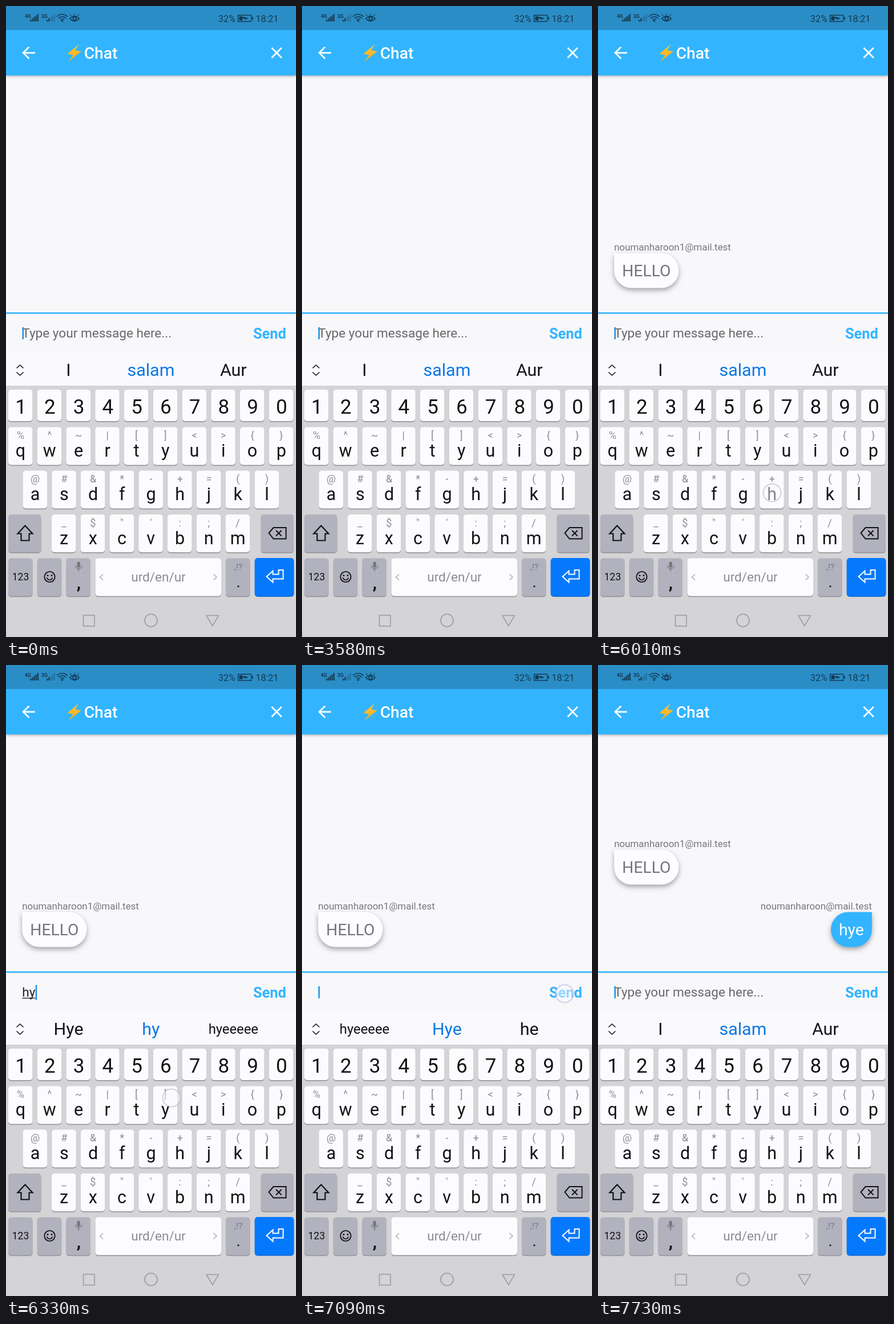
An HTML page with a canvas that plays this animation: 508x1102 px, repeating every 8 s.

```html
<!DOCTYPE html>
<html lang="en">
<head>
<meta charset="utf-8">
<title>Chat</title>
<style>
  html, body { margin: 0; width: 100%; height: 100%; overflow: hidden; background: #f8f7fa; }
  canvas { display: block; width: 508px; height: 1102px; }
</style>
</head>
<body>
<canvas id="stage"></canvas>
<script>
const W = 508, H = 1102, LOOP = 8000;
const BLUE = '#33b4ff', PAPER = '#f8f7fa', BOARD = '#d4d3d5', KEY = '#fcfbfe', DARK_KEY = '#b2b2be';
const INK = '#121214', HINT = '#8d8c92', ACCENT = '#0b78e3', STATUS = '#123a52';
const PITCH = 50.75;

const canvas = document.getElementById('stage');
const ctx = canvas.getContext('2d');
const dpr = window.devicePixelRatio || 1;
canvas.width = W * dpr;
canvas.height = H * dpr;

// Timeline
const ARRIVE = 3710, SENT = 7160, CLEARED = 7050;
const typed = [[6050, 'h'], [6320, 'hy'], [6640, 'hye'], [CLEARED, '']];
const hints = [
  [0, ['I', 'salam', 'Aur']],
  [6050, ['He', 'h', 'ho']],
  [6320, ['Hye', 'hy', 'hyeeeee']],
  [6640, ['hyeeeee', 'Hye', 'he']],
  [SENT, ['I', 'salam', 'Aur']]
];
// Each fade flips the caret, which starts visible
const fades = [
  [60, 190], [580, 700], [1020, 1280], [1470, 1730], [2050, 2170], [2560, 2680],
  [3000, 3200], [3579, 3580], [4030, 4160], [4500, 4600], [5030, 5160], [5440, 5560],
  [7470, 7540], [7600, 7730]
];
const touches = [
  [4590, 4790, 232, 567], [5940, 6120, 305, 850], [6230, 6410, 290, 756],
  [6560, 6710, 126, 768], [6990, 7220, 460, 574]
];

const clamp = v => Math.max(0, Math.min(1, v));
const latest = (list, t, start) => list.reduce((v, [at, x]) => t >= at ? x : v, start);

function caretAlpha(t) {
  let a = 1;
  fades.forEach(([from, to], i) => {
    const p = clamp((t - from) / (to - from));
    a += i % 2 ? p : -p;
  });
  return clamp(a);
}

// Drawing helpers
function text(str, x, y, size, color, align = 'left', weight = 400) {
  ctx.font = `${weight} ${size}px Roboto, sans-serif`;
  ctx.textAlign = align;
  ctx.fillStyle = color;
  ctx.fillText(str, x, y);
}

function rect(x, y, w, h, color) {
  ctx.fillStyle = color;
  ctx.fillRect(x, y, w, h);
}

function box(x, y, w, h, r, color) {
  ctx.beginPath();
  ctx.roundRect(x, y, w, h, r);
  ctx.fillStyle = color;
  ctx.fill();
}

function trace(d, color, width) {
  ctx.strokeStyle = color;
  ctx.lineWidth = width;
  ctx.stroke(new Path2D(d));
}

function shape(d, color) {
  ctx.fillStyle = color;
  ctx.fill(new Path2D(d));
}

function ring(x, y, r, color, width, from = 0, to = Math.PI * 2) {
  ctx.beginPath();
  ctx.arc(x, y, r, from, to);
  ctx.strokeStyle = color;
  ctx.lineWidth = width;
  ctx.stroke();
}

function dot(x, y, r, color) {
  ctx.beginPath();
  ctx.arc(x, y, r, 0, Math.PI * 2);
  ctx.fillStyle = color;
  ctx.fill();
}

function shadow(color, blur, dy) {
  ctx.shadowColor = color;
  ctx.shadowBlur = blur * dpr;
  ctx.shadowOffsetY = dy * dpr;
}

// Status bar
function signal(x, full) {
  for (let i = 0; i < 5; i++) {
    const h = 3 + i * 2.5;
    rect(x + i * 3.2, 27 - h, 2.2, h, i < full ? STATUS : 'rgba(18,58,82,.3)');
  }
}

function statusBar() {
  rect(0, 0, W, 42, '#2b8dc6');
  text('4G', 33, 21, 8.5, STATUS, 'left', 700);
  signal(42, 5);
  text('3G', 62, 21, 8.5, STATUS, 'left', 700);
  signal(71, 2);
  for (const r of [4.5, 8.5, 12.5]) ring(98.5, 27, r, STATUS, 1.7, -Math.PI * .77, -Math.PI * .23);
  dot(98.5, 26, 1.8, STATUS);
  trace('M112 22Q120 13 128 22Q120 31 112 22Z', STATUS, 1.6);
  ring(120, 22, 2.8, STATUS, 1.8);
  trace('M114 17L112.5 15M120 15.5V13.5M126 17L127.5 15', STATUS, 1.3);
  text('32%', 372, 27.5, 16, STATUS);
  trace('M406.5 16H429.5V27H406.5Z', STATUS, 1.3);
  rect(408.5, 18, 6, 7, STATUS);
  rect(431, 19, 2, 5, STATUS);
  shape('M413 21L419 18.5V20.5H425L419 24.5V22.5Z', STATUS);
  text('18:21', 437.5, 27.5, 16, STATUS);
}

function header() {
  ctx.save();
  shadow('rgba(0,0,0,.32)', 5, 2);
  rect(0, 42, W, 79.3, BLUE);
  ctx.restore();
  statusBar();
  trace('M50.8 81.8H31M40.5 71.5L30.2 81.8L40.5 92.1', '#fff', 2.8);
  trace('M465.4 73.1L482.8 90.5M482.8 73.1L465.4 90.5', '#fff', 2.8);
  const g = ctx.createLinearGradient(0, 67, 0, 97);
  g.addColorStop(0, '#ffc933');
  g.addColorStop(1, '#fba81e');
  shape('M127.5 67L107.5 83.5L117.5 86L109 97.5L131.5 79.5L121 77Z', g);
  text('Chat', 136.7, 91.5, 28.22, '#fff', 'left', 500);
}

// Conversation
function message(y, from, body, mine) {
  const size = 28.22, pad = 14.1;
  ctx.font = `400 ${size}px Roboto, sans-serif`;
  const w = ctx.measureText(body).width + pad * 2;
  const x = mine ? 479.8 - w : 28.2;
  text(from, mine ? 479.8 : 28.2, y + 15.5, 16.93, '#77767a', mine ? 'right' : 'left');
  ctx.save();
  shadow('rgba(0,0,0,.34)', 8, 4);
  box(x, y + 20, w, 61, mine ? [30.5, 0, 30.5, 30.5] : [0, 30.5, 30.5, 30.5], mine ? BLUE : '#fdfcff');
  ctx.restore();
  text(body, x + pad, y + 60.5, size, mine ? '#fff' : '#757478');
}

function conversation(t) {
  if (t < ARRIVE) return;
  const sent = t >= SENT;
  message(sent ? 302.5 : 411.5, 'noumanharoon1@mail.test', 'HELLO', false);
  if (sent) message(411.5, 'noumanharoon@mail.test', 'hye', true);
}

function inputRow(t) {
  rect(0, 535, W, 2.6, BLUE);
  const value = latest(typed, t, '');
  const empty = t < typed[0][0] || t >= SENT;
  let end = 28.2;
  if (empty) {
    text('Type your message here...', 28.2, 579, 22.58, '#69686b');
  } else if (value) {
    text(value, 28.2, 579, 22.58, '#222');
    const w = ctx.measureText(value).width;
    rect(28.2, 581, w, 1.4, '#222');
    end += w;
  }
  ctx.globalAlpha = caretAlpha(t);
  rect(end + .3, value ? 559 : 561, 2.6, value ? 26 : 21, '#2196e8');
  ctx.globalAlpha = 1;
  text('Send', 433, 581, 25.4, BLUE, 'left', 700);
}

// Keyboard
function suggestions(t) {
  rect(0, 606, W, 57, '#faf9fd');
  trace('M18.5 632.5L24.5 627L30.5 632.5M18.5 639.5L24.5 645L30.5 639.5', INK, 1.6);
  latest(hints, t).forEach((word, i) => {
    const long = word.length > 5;
    text(word, 109.5 + i * 144.4, long ? 643.5 : 645.5, long ? 23.8 : 30.4, i === 1 ? ACCENT : INK, 'center');
  });
}

function key(x, y, w, h, color = KEY, edge = '#99989d') {
  box(x, y + 1.8, w, h, 5, edge);
  box(x, y, w, h, 5, color);
}

function letterRow(letters, marks, x, y) {
  [...letters].forEach((c, i) => {
    const left = x + i * PITCH, mid = left + 21.5;
    key(left, y, 42.5, 66);
    text(marks[i], mid, y + 20.5, 18, HINT, 'center');
    text(c, mid, y + 51.5, 30.5, INK, 'center');
  });
}

function keyRows() {
  rect(0, 663, W, 439, BOARD);
  [...'1234567890'].forEach((c, i) => {
    key(4 + i * PITCH, 670, 42.5, 55);
    text(c, 26 + i * PITCH, 712, 35, INK, 'center');
  });
  letterRow('qwertyuiop', '%^~|[]<>{}', 4, 735.5);
  letterRow('asdfghjkl', '@#&*-+=()', 29.5, 811.5);
  letterRow('zxcvbnm', '_$"\':;/', 80, 888);

  key(4, 888, 57.5, 66, DARK_KEY);
  trace('M33.5 907.5L20.5 921.5H26.5V933.5H40.5V921.5H46.5Z', INK, 2.2);
  key(446.5, 888, 57.5, 66, DARK_KEY);
  trace('M460.5 920.5L468.5 911H490.5V930.5H468.5Z', INK, 2);
  trace('M473 916L482.5 925.5M482.5 916L473 925.5', INK, 2);
}

function bottomRow() {
  const y = 964.5;
  for (const x of [4, 54.75, 105.5, 385]) key(x, y, 42.5, 66, DARK_KEY);
  text('123', 25.5, 1003, 17.5, INK, 'center');
  ring(76.5, 997, 9.2, INK, 1.8);
  dot(73, 994.5, 1.5, INK);
  dot(80, 994.5, 1.5, INK);
  ring(76.5, 997, 5.2, INK, 1.6, .25, Math.PI - .25);
  box(124.5, 970.5, 5.5, 10.5, 2.7, '#77767e');
  trace('M121.5 977.5A5.8 6 0 0 0 133 977.5M127.25 983.5V987.5', '#77767e', 1.5);
  text(',', 127.5, 1018, 30, INK, 'center', 700);

  key(156.5, y, 220.5, 66);
  text('urd/en/ur', 267, 1005, 22.5, HINT, 'center');
  trace('M170 992.5L164.5 997.5L170 1002.5M363.5 992.5L369 997.5L363.5 1002.5', '#aaa9ae', 1.4);
  text(',!?', 407, 984.5, 15.5, '#77767e', 'center');
  text('.', 407, 1015, 27, INK, 'center');

  key(435.7, 964, 68.6, 66, '#0579fe', '#0668d8');
  trace('M456.5 996.5L467.5 986.5V992.5H477.5V985H485.5V1000.5H467.5V1006.5Z', '#fff', 2);

  const nav = '#9c9b9f';
  trace('M135.5 1064H155V1083H135.5Z', nav, 1.6);
  ring(254, 1073, 11, nav, 1.6);
  trace('M351 1064.5H372.5L361.75 1082.5Z', nav, 1.6);
}

function drawTouches(t) {
  for (const [from, to, x, y] of touches) {
    if (t < from || t > to) continue;
    ctx.globalAlpha = clamp((to - t) / 80);
    dot(x, y, 15.5, 'rgba(250,249,255,.5)');
    ring(x, y, 15.5, 'rgba(186,182,214,.6)', 2);
    ctx.globalAlpha = 1;
  }
}

function draw(t) {
  ctx.setTransform(dpr, 0, 0, dpr, 0, 0);
  rect(0, 0, W, H, PAPER);
  conversation(t);
  header();
  inputRow(t);
  suggestions(t);
  keyRows();
  bottomRow();
  drawTouches(t);
}

const start = performance.now();
function tick() {
  draw((performance.now() - start) % LOOP);
  requestAnimationFrame(tick);
}
tick();
</script>
</body>
</html>
```
